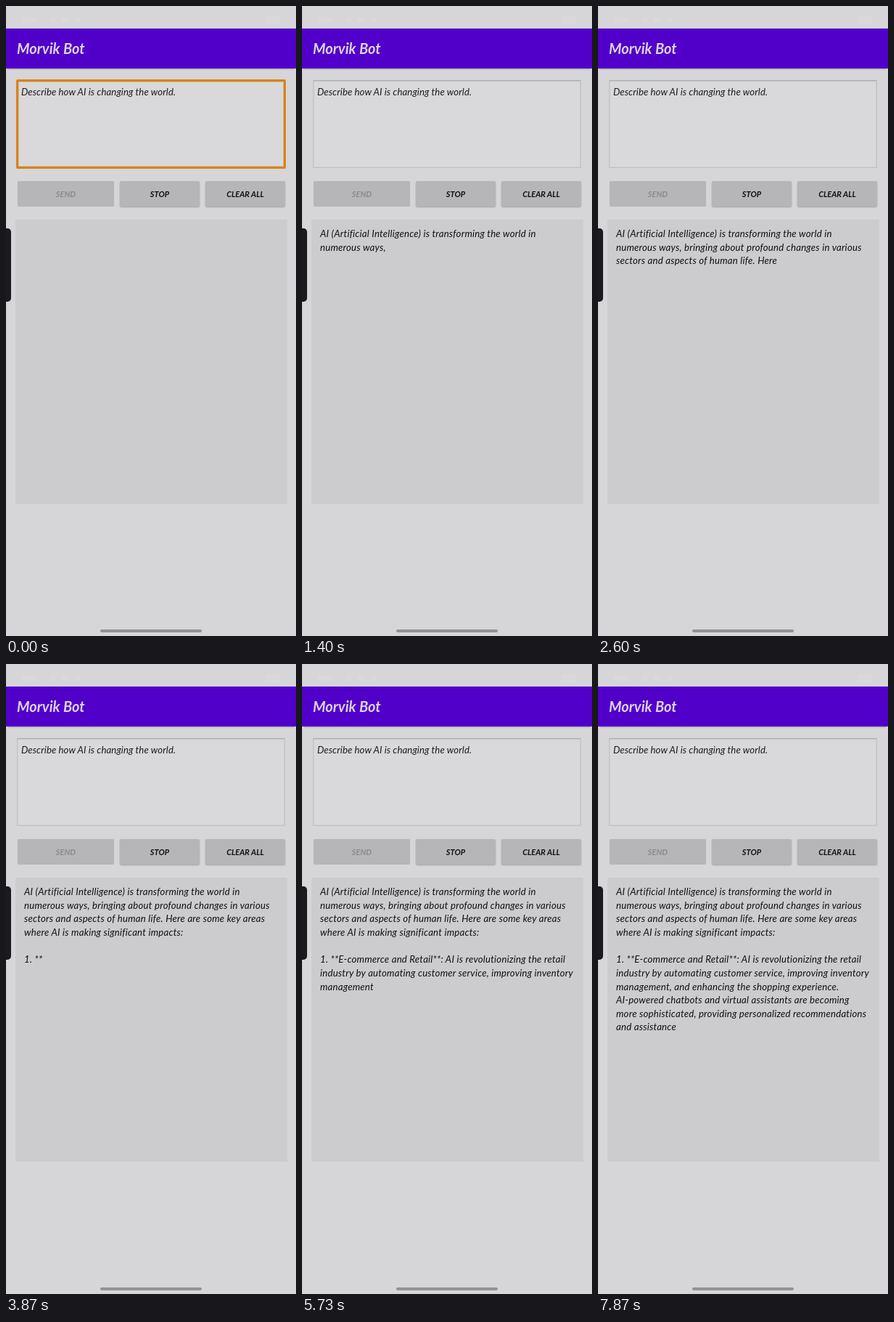
Animation of 400 by 867 pixels, one loop 8 s. Source, as an HTML page:

```html
<!DOCTYPE html>
<html lang="en">
<head>
<meta charset="utf-8">
<title>Chat demo</title>
<style>
html, body { margin: 0; width: 100%; height: 100%; overflow: hidden; background: #d6d5d7; }
#stage {
  position: relative; width: 400px; height: 867px; overflow: hidden;
  font: italic 13.2px/18.62px Lato, "Open Sans", sans-serif; color: #111013; background: #d6d5d7;
}
#stage > * { position: absolute; box-sizing: border-box; white-space: pre; }
.status { background: #d9d8da; border-radius: 4px; }
.bar {
  left: 0; top: 31px; width: 400px; height: 55px; padding-left: 15px;
  background: #5100c9; color: #dcd3e8; font-size: 20px; font-weight: 700; line-height: 55px;
  box-shadow: 0 3px 2px -2px rgba(0, 0, 0, .25);
}
.prompt {
  left: 15px; top: 102px; width: 370px; height: 121px; padding: 6px 0 0 5px;
  background: #d9d8da; border: 1px solid #c1c0c2; border-top-color: #aeadaf;
  box-shadow: inset 0 1px 1px #c6c5c7, inset 0 0 0 1px #cfced0; color: #1d1c1f;
  letter-spacing: .08px;
}
.focus {
  left: 14px; top: 101px; width: 372px; height: 123px;
  border: 3px solid #d9821a; border-radius: 2px;
}
.focus::after { content: ""; position: absolute; inset: 0; border: 1px dotted #c9a578; }
.button {
  top: 241px; height: 35px; background: #b6b5b7; border-radius: 2px;
  font-size: 11px; font-weight: 700; line-height: 35px; text-align: center;
  box-shadow: 0 1px 2px rgba(0, 0, 0, .25);
}
.off { color: #8b8a8c; box-shadow: 0 0 1px rgba(0, 0, 0, .15); }
.reply {
  left: 13px; top: 294px; width: 375px; height: 391px; padding: 10.2px 0 0 12px;
  background: #cccbcd; letter-spacing: .22px;
}
.handle { left: -6px; top: 306px; width: 13px; height: 101px; border-radius: 5px; background: #1b1a1e; }
.nav { left: 130px; top: 857.5px; width: 140px; height: 4px; border-radius: 2px; background: #929193; }
</style>
</head>
<body>
<div id="stage">
  <i class="status" style="left:22px;top:16px;width:20px;height:7px"></i>
  <i class="status" style="left:60px;top:16px;width:9px;height:7px"></i>
  <i class="status" style="left:77px;top:16px;width:8px;height:7px"></i>
  <i class="status" style="left:95px;top:16px;width:8px;height:7px"></i>
  <i class="status" style="left:358px;top:13px;width:20px;height:12px"></i>
  <div class="bar">Morvik Bot</div>
  <div class="prompt">Describe how AI is changing the world.</div>
  <div class="focus"></div>
  <div class="button off" style="left:16px;width:133px">SEND</div>
  <div class="button" style="left:157px;width:110px">STOP</div>
  <div class="button" style="left:275px;width:110px">CLEAR ALL</div>
  <div class="reply"></div>
  <div class="handle"></div>
  <div class="nav"></div>
</div>
<script>
const LOOP = 8000;

// Bursts of tokens: first time, last time, tokens spread evenly between them.
const bursts = [
  [130, 870, "AI| (|Art|ificial| Intelligence|)| is| transforming| the"],
  [1000, 1130, " world| in|\nnumerous"],
  [1270, 1400, " ways|,"],
  [1470, 1600, " bringing| about| profound"],
  [1730, 1930, " changes| in| various|\nsectors"],
  [2070, 2130, " and| aspects"],
  [2270, 2330, " of| human"],
  [2470, 2670, " life|.| Here| are"],
  [2800, 2870, " some| key"],
  [2930, 3530, " areas|\nwhere| AI| is| making| significant| impacts|:"],
  [3670, 3730, "\n\n1|."],
  [3870, 4600, " **|E|-com|merce| and| Retail|**:| AI| is| revolutionizing"],
  [4730, 5130, " the| retail|\nindustry| by| autom|ating"],
  [5270, 5330, " customer| service"],
  [5470, 6130, ",| improving| inventory|\nmanagement|,| and| enhancing| the| shopping"],
  [6270, 6330, " experience|."],
  [6470, 6870, "\nAI|-|powered| chatbots| and| virtual"],
  [7000, 7130, " assistants| are| becoming"],
  [7270, 7330, "\nmore| sophisticated"],
  [7470, 7730, ",| providing| personalized| recommendations|\nand"],
  [7870, 7870, " assistance"]
];

// Snap to a 15 fps grid with times in whole hundredths.
const snap = ms => Math.round(Math.round(ms * 15 / 1000) * 20 / 3) * 10;

// All animations are made in one task, so they share a start on the first painted frame.
function switchAt(el, ms, from, to) {
  el.animate([
    { opacity: from, offset: 0, easing: "step-end" },
    { opacity: to, offset: ms / LOOP, easing: "step-end" },
    { opacity: to, offset: 1 }
  ], { duration: LOOP, iterations: Infinity });
}

const reply = document.querySelector(".reply");
for (const [first, last, text] of bursts) {
  const tokens = text.split("|");
  const gap = (last - first) / Math.max(1, tokens.length - 1);
  tokens.forEach((token, i) => {
    const span = document.createElement("span");
    span.textContent = token;
    reply.append(span);
    switchAt(span, snap(first + i * gap), 0, 1);
  });
}
switchAt(document.querySelector(".focus"), 70, 1, 0);
</script>
</body>
</html>
```
